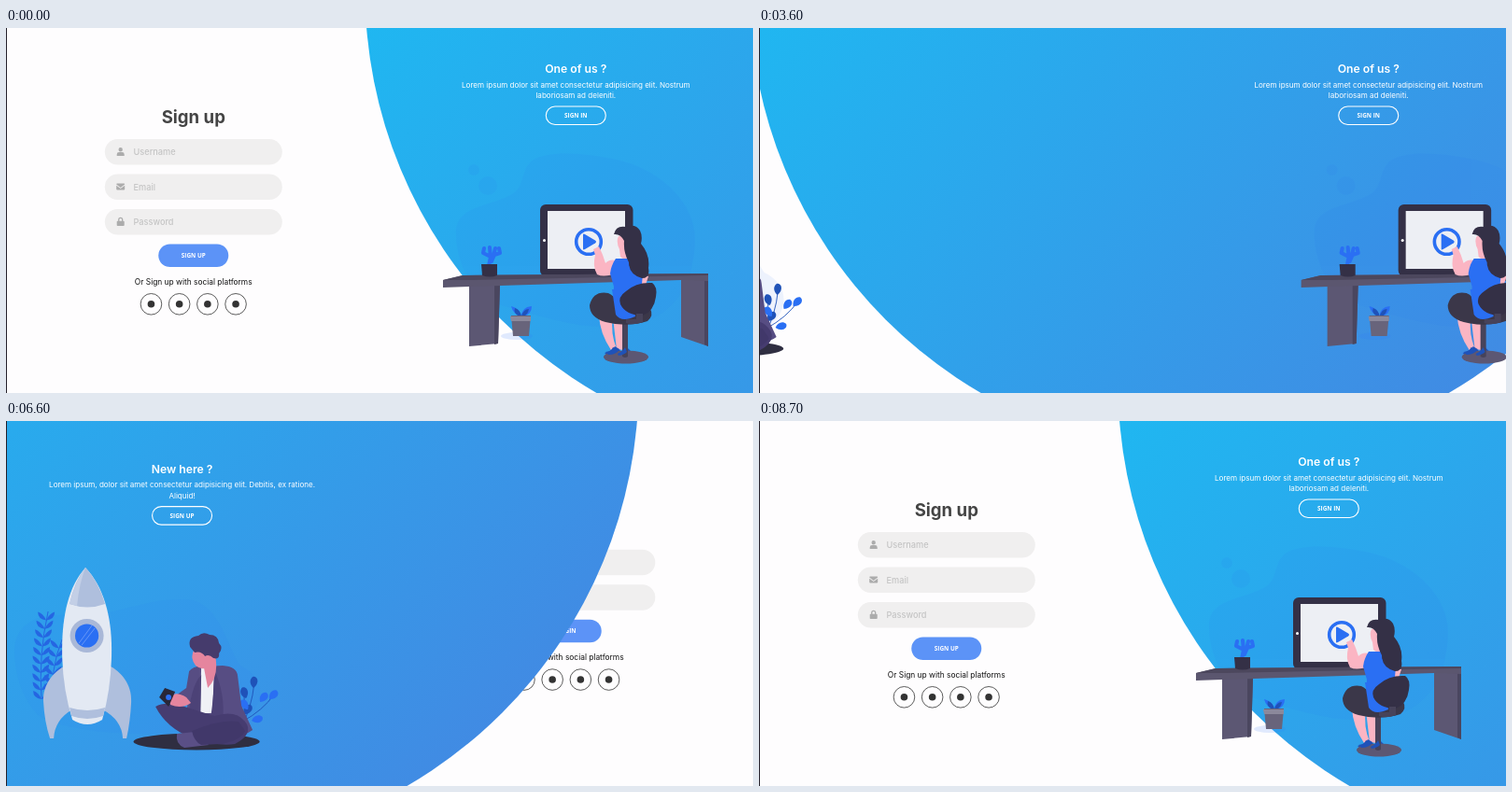
Write an HTML page that moves like this. It is 800x391 px and loops after 8800 ms.

```html
<!DOCTYPE html>
<html lang="en">
<head>
<meta charset="utf-8">
<title>Sliding sign in and sign up</title>
<style>
  html, body { margin: 0; width: 100%; height: 100%; overflow: hidden; background: #fefdfe; }
  svg { display: block; width: 100%; height: 100%; }
  text { font-family: Inter, "Open Sans", sans-serif; text-anchor: middle; }
  .title { font-size: 18.6px; font-weight: 700; fill: #444; }
  .field { fill: #f0efef; }
  .hint { font-size: 9.2px; font-weight: 500; fill: #c4c4c4; text-anchor: start; }
  .icon { fill: #acacac; }
  .button { fill: #5c93f7; }
  .caps { font: 700 6.4px "Open Sans", "Noto Sans", sans-serif; fill: #fff; }
  .social { font-size: 8.4px; fill: #111; }
  .ring { fill: none; stroke: #333; stroke-width: .8; }
  .dot { fill: #333; }
  .panel-title { font-size: 12.2px; font-weight: 600; fill: #fff; }
  .copy { font-size: 8.05px; fill: #fff; }
  .outline { fill: none; stroke: #fff; stroke-width: 1.1; }
  .blue { fill: #2a6ff3; }
  .navy { fill: #1f52b8; }
  .ink { fill: #343046; }
  .slate { fill: #5c5773; }
  .skin { fill: #fbb5c3; }
  .steel { fill: #afbfdd; }
  .blob { fill: #2a6ff3; opacity: .08; }
</style>
</head>
<body>
<svg viewBox="0 0 800 391">
  <defs>
    <linearGradient id="sky" x1="1" y1="1" x2="0" y2="0">
      <stop stop-color="#4980e0"/>
      <stop offset="1" stop-color="#10cbf7"/>
    </linearGradient>
    <path id="leaf" d="M0 0C-5-3-6-9-2-12C3-13 6-6 0 0Z"/>
    <path id="frond" d="M0 0Q3-7 9-9Q9-1 0 0Z"/>
    <path id="user" d="M-4 4.5V3Q-4 .6-1.6.6H1.6Q4 .6 4 3V4.5ZM-2.2-2.3a2.2 2.2 0 1 1 4.4 0a2.2 2.2 0 1 1-4.4 0Z"/>
    <path id="mail" d="M-4.5-2.4Q-4.5-3.4-3.5-3.4H3.5Q4.5-3.4 4.5-2.4L0 1L-4.5-2.4ZM-4.5-1.2L0 2.1L4.5-1.2V2.4Q4.5 3.4 3.5 3.4H-3.5Q-4.5 3.4-4.5 2.4Z"/>
    <path id="lock" fill-rule="evenodd" d="M-4 0Q-4-.8-3.2-.8H-2.6V-2.2A2.6 2.6 0 0 1 2.6-2.2V-.8H3.2Q4-.8 4 0V3.7Q4 4.5 3.2 4.5H-3.2Q-4 4.5-4 3.7ZM-1.3-.8H1.3V-2.2A1.3 1.3 0 0 0-1.3-2.2Z"/>
  </defs>

  <g id="forms"></g>
  <circle id="disc" cy="-40" r="498.5" fill="url(#sky)"/>

  <g id="rocketScene">
    <path class="blob" d="M50 250C48 215 78 205 110 208C160 210 185 190 232 191C270 192 276 240 292 262C320 275 322 308 285 328C220 340 110 338 75 315Q52 290 50 250Z"/>
    <g id="fern" fill="#2566e2" stroke="#2566e2"></g>
    <g class="navy">
      <path d="M291 331Q304 310 307 279M294 322Q316 310 328 293M296 316Q296 300 296 287" fill="none" stroke="#1f52b8" stroke-width=".9"/>
      <use href="#leaf" transform="translate(306 286) rotate(8)"/>
      <use href="#leaf" transform="translate(298 297) rotate(-12)"/>
      <use href="#leaf" transform="translate(296 314) rotate(42)"/>
    </g>
    <g class="blue">
      <use href="#leaf" transform="translate(313 301) rotate(42)"/>
      <use href="#leaf" transform="translate(323 298) rotate(48)"/>
      <use href="#leaf" transform="translate(304 321) rotate(80)"/>
      <use href="#leaf" transform="translate(300 309) rotate(-30)"/>
    </g>

    <path class="steel" d="M105 262C92 268 80 282 81 301Q82 322 88 340H92Q93 320 112 309ZM151 262C164 268 176 282 175 301Q174 322 170 340H166Q165 320 144 309Z"/>
    <path d="M126 157C145 177 154 208 154 245Q154 285 144 320Q128 330 112 320Q101 285 101 245C101 208 108 177 126 157Z" fill="#e3e9f3"/>
    <path class="steel" d="M126 157Q140 172 147 196Q128 203 109 196Q114 172 126 157ZM109 307Q128 313 147 307L145 316Q128 322 111 316Z"/>
    <path d="M126 157Q115 172 109 196L117 198Q119 175 126 157Z" fill="#c3cfe6"/>
    <circle cx="127.500" cy="230" r="18" fill="#a9b8d8"/>
    <circle class="blue" cx="127.500" cy="230" r="12.6"/>
    <path d="M119 238L133 219M122 240L136 222" stroke="#6596f7" stroke-width="1"/>

    <ellipse cx="245" cy="343.500" rx="67.500" ry="9" fill="#2f2e41"/>
    <path d="M237 268Q242 262 253 263L273 262Q288 263 289 273L293 305L305 331Q296 338 284 336L236 332Q233 315 236 299Q226 302 220 296L234 286Z" fill="#574d83"/>
    <path d="M250 263L264 262L262 313H249Z" fill="#f0f1f6"/>
    <path d="M250 272L249 319L236 322Q238 285 250 272ZM264 267Q264 290 260 319L273 322Q276 292 264 267Z" fill="#4c4277"/>
    <path d="M243 244Q237 253 244 262Q249 266 253 265L257 286Q267 276 266 260L265 246Z" fill="#e5859e"/>
    <path d="M238 242Q235 231 247 230Q252 225 259 229Q268 229 269 238Q274 243 269 249Q270 256 263 254Q258 249 254 252Q250 246 243 248Z" fill="#453b6c"/>
    <path d="M201 306Q211 300 229 305L264 316Q289 308 299 325Q304 337 286 346Q268 349 239 339Q213 329 201 306Z" fill="#463c70"/>
    <path d="M243 333L224 335Q222 346 232 350L258 347Z" fill="#5a4f86"/>
    <path d="M290 322Q270 319 240 332Q242 343 250 347L270 346Q292 343 297 332Z" fill="#41386a"/>
    <path d="M216 295Q223 289 234 296L239 302Q229 309 217 304Z" fill="#e5859e"/>
    <path d="M211 286L222 290L215 306L205 296Z" fill="#292738"/>
    <circle class="blue" cx="215" cy="296" r="3"/>
  </g>

  <g id="deskScene">
    <g class="blob">
      <path d="M482 222C480 190 515 193 542 178C557 169 550 149 567 140C588 130 630 136 654 141C699 151 737 185 738 225C738 269 718 309 674 317C629 327 582 312 541 300C505 292 483 260 482 222Z"/>
      <circle cx="501" cy="152" r="6"/>
      <circle cx="516" cy="169" r="10"/>
    </g>
    <ellipse cx="547" cy="330" rx="17" ry="4" fill="#2a6ff3" opacity=".14"/>
    <path class="slate" d="M496 276H529L527 338L496 341ZM723 268H752V341L723 331Z"/>
    <path d="M523 276H529L527 338L523 339ZM748 268H752V341L748 339Z" fill="#4a465f"/>
    <rect class="ink" x="572" y="189" width="99.500" height="77" rx="6"/>
    <rect x="580" y="196" width="83" height="62" fill="#edeff4"/>
    <circle cx="576.500" cy="227.500" r="1.500" fill="#fff"/>
    <path d="M468 270L489 265L752 263V271L723 270L529 276L468 278Z" fill="#5b566f"/>
    <path d="M468 270L489 265L752 263V265L500 270Z" fill="#4c475d"/>
    <circle cx="624" cy="229" r="13.300" fill="none" stroke="#2a6ff3" stroke-width="3.600"/>
    <path class="blue" d="M618 221.500Q618 220 620 221L631 227.500Q633 229 631 230.500L620 237Q618 238 618 236.500Z"/>

    <path d="M517 255L519 245L511 241L512 236M519 246L518 235M520 250L523 243L529 241L528 236M522 244L524 236" fill="none" stroke="#2a6ff3" stroke-width="4" stroke-linejoin="round" stroke-linecap="round"/>
    <path class="ink" d="M509 253H526V265Q518 268 510 265Z"/>
    <path class="blue" d="M552 309Q543 307 541 298Q550 300 552 309Q552 299 563 298Q563 306 555 309Z"/>
    <path class="navy" d="M550 309Q543 306 545 300Q551 302 552 309Q554 301 560 301Q559 307 554 309Z"/>
    <path d="M541 308H562L560 330H543Z" fill="#68647b"/>
    <path d="M540 309H562V314H541Z" fill="#8c899b"/>

    <path class="skin" d="M635 308Q636 327 648 345L654 344Q647 326 650 310ZM650 310Q652 328 654 344L662 345Q660 326 662 310Z"/>
    <path class="navy" d="M641 348Q648 347 650 342L658 345Q655 351 644 351ZM654 349Q661 347 664 341L669 346Q667 352 655 352Z"/>
    <ellipse class="slate" cx="664" cy="352.500" rx="24" ry="7"/>
    <path d="M660 309H666V352Q663 354 660 352Z" fill="#47435a"/>
    <path class="navy" d="M642 347Q650 346 652 341L657 344Q654 350 645 350ZM655 349Q661 346 663 342L665 347Q662 350 656 351Z"/>
    <path class="skin" d="M654 249Q646 247 642 252L639 243L635 234L629 237L631 243Q628 256 633 264Q641 268 655 262ZM656 223Q653 229 657 237L658 245L669 253L676 233L668 221Z"/>
    <path class="blue" d="M653 247Q648 254 647 263L651 277L650 304Q660 318 680 308L684 267Q682 252 669 247Z"/>
    <path d="M625 297Q629 281 645 284Q651 286 654 294L690 301Q694 308 687 314Q665 321 642 315Q625 310 625 297Z" fill="#3b3749"/>
    <path class="blue" d="M649 280L672 280L674 309Q659 316 653 307Z"/>
    <path class="skin" d="M682 264L688 266L685 275L681 274Z"/>
    <path class="ink" d="M651 221Q653 211 664 213Q674 209 679 217Q682 223 680 231Q690 243 688 257Q690 268 681 268Q667 264 667 251Q661 240 662 228Q658 220 651 221Z"/>
    <path class="ink" d="M664 282Q675 272 692 273Q698 277 696 288Q694 303 682 308Q664 308 658 296Q655 288 664 282Z"/>
    <path d="M675 306H682V315Q672 319 664 316V312H675Z" fill="#47435a"/>
  </g>

  <g id="rocketText"></g>
  <g id="deskText"></g>
  <rect width="1" height="391" fill="#24202b"/>
</svg>

<script>
const LOOP = 8800, STEP = 100, RATE = 0.952;
const TO_SIGN_IN = 2755, TO_SIGN_UP = 5919;
const HALF = 399.5, SLIDE = 400;
const $ = id => document.getElementById(id);

const form = (id, top, title, fields, button, line) => {
  const inputs = fields.map(([icon, hint], i) => {
    const y = top + 37.5 * i;
    return `<rect class="field" x="105.8" y="${y}" width="190" height="27.5" rx="13.75"/>
      <use class="icon" href="#${icon}" x="122.7" y="${y + 13.5}"/>
      <text class="hint" x="136.5" y="${y + 17}">${hint}</text>`;
  }).join('');
  const y = top + 37.5 * fields.length;
  const socials = [-45.3, -15.1, 15.1, 45.3].map(dx =>
    `<circle class="ring" cx="${200.75 + dx}" cy="${y + 64.3}" r="11.3"/>
     <circle class="dot" cx="${200.75 + dx}" cy="${y + 64.3}" r="3.8"/>`).join('');
  return `<g id="${id}">
    <text class="title" x="200.75" y="${top - 17}">${title}</text>${inputs}
    <rect class="button" x="163.25" y="${y}" width="75" height="24.5" rx="12.25"/>
    <text class="caps" x="200.75" y="${y + 14.7}">${button}</text>
    <text class="social" x="200.75" y="${y + 43.6}">${line}</text>${socials}</g>`;
};

const panel = (x, y, title, lines, button) => `
  <text class="panel-title" x="${x}" y="${y}">${title}</text>
  <text class="copy" x="${x}" y="${y + 15.6}">${lines[0]}</text>
  <text class="copy" x="${x}" y="${y + 27}">${lines[1]}</text>
  <rect class="outline" x="${x - 32}" y="${y + 36}" width="64" height="19.5" rx="9.75"/>
  <text class="caps" x="${x}" y="${y + 48.1}">${button}</text>`;

const user = ['user', 'Username'], mail = ['mail', 'Email'], lock = ['lock', 'Password'];
$('forms').innerHTML =
  form('signIn', 137.75, 'Sign in', [user, lock], 'LOGIN', 'Or Sign in with social platforms') +
  form('signUp', 119, 'Sign up', [user, mail, lock], 'SIGN UP', 'Or Sign up with social platforms');
$('rocketText').innerHTML = panel(190.8, 55.6, 'New here ?',
  ['Lorem ipsum, dolor sit amet consectetur adipisicing elit. Debitis, ex ratione.', 'Aliquid!'], 'SIGN UP');
$('deskText').innerHTML = panel(610.3, 48, 'One of us ?',
  ['Lorem ipsum dolor sit amet consectetur adipisicing elit. Nostrum', 'laboriosam ad deleniti.'], 'SIGN IN');

const stem = (x, y, lean, height) => {
  const pairs = Math.round(height / 9);
  let out = `<path d="M${x} ${y}q${-lean / 2} ${-height / 2} ${lean} ${-height}" fill="none"/>`;
  for (let i = 0; i < pairs; i++) {
    const k = i / pairs, at = `translate(${x + lean * (2 * k * k - k)} ${y - height * k})`;
    out += `<use href="#frond" stroke="none" transform="${at}"/>
      <use href="#frond" stroke="none" transform="${at} scale(-1 1)"/>`;
  }
  return out;
};
$('fern').innerHTML = stem(79, 298, 7, 94) + stem(92, 300, 9, 66);

// cubic-bezier(.42, 0, .58, 1), solved by bisection
const easeInOut = x => {
  if (x <= 0) return 0;
  if (x >= 1) return 1;
  let lo = 0, hi = 1, u;
  for (let i = 0; i < 24; i++) {
    u = (lo + hi) / 2;
    const v = 1 - u;
    if (1.26 * v * v * u + 1.74 * v * u * u + u ** 3 < x) lo = u; else hi = u;
  }
  return u * u * (3 - 2 * u);
};

// 0 shows sign up, 1 shows sign in
const mode = (time, delay, duration) => {
  const part = start => easeInOut(((time - start) * RATE / 1000 - delay) / duration);
  return part(TO_SIGN_IN) - part(TO_SIGN_UP);
};

const slide = (id, x) => $(id).setAttribute('transform', `translate(${x.toFixed(2)} 0)`);

function draw() {
  const time = Math.floor(performance.now() % LOOP / STEP) * STEP;
  const image = mode(time, 0.4, 1.1);
  const text = mode(time, 0.6, 0.9);
  const fade = mode(time, 0.7, 0.2);
  $('disc').setAttribute('cx', 883 - 965 * mode(time, 0, 1.8));
  slide('forms', HALF * mode(time, 0.7, 1));
  slide('deskScene', SLIDE * image);
  slide('rocketScene', SLIDE * (image - 1) + 1);
  slide('deskText', SLIDE * text);
  slide('rocketText', SLIDE * (text - 1));
  $('signIn').style.opacity = fade;
  $('signUp').style.opacity = 1 - fade;
  requestAnimationFrame(draw);
}
draw();
</script>
</body>
</html>
```
